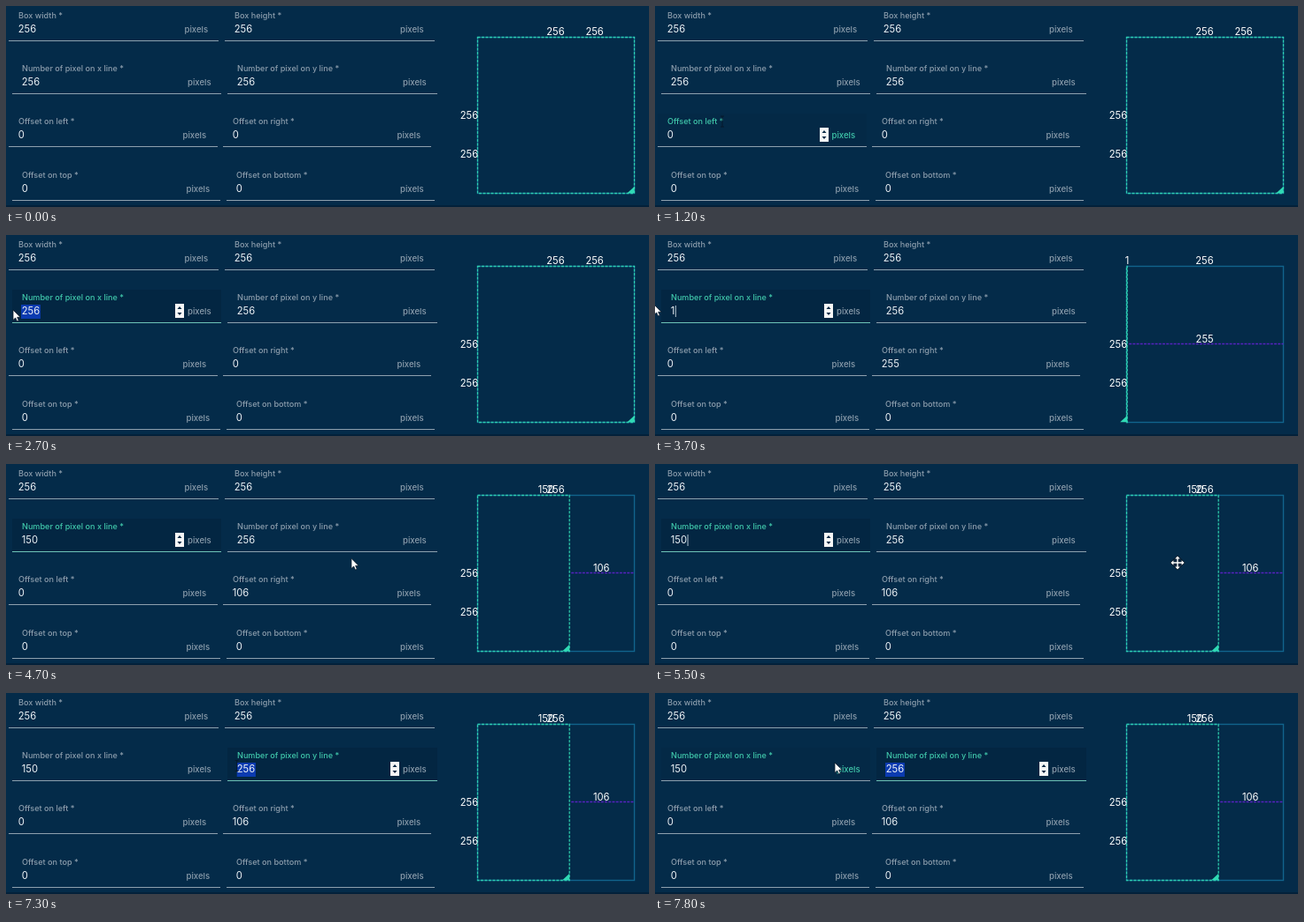
Recreate the animation shown at these times as an HTML page. Size 726 px wide and 228 px high, loop 8000 ms.

```html
<!DOCTYPE html>
<html lang="en">
<head>
<meta charset="utf-8">
<title>Box settings</title>
<style>
html, body { margin: 0; width: 100%; height: 100%; overflow: hidden; background: #042b49; }
svg { display: block; width: 726px; height: 228px; }
text { font-family: Inter, "Open Sans", sans-serif; }
.label { font-size: 9.1px; font-weight: 500; }
.unit { font-size: 9.6px; font-weight: 500; }
.value { font-size: 11.2px; fill: #eef2f6; }
.size { font-size: 11.2px; fill: #fff; text-anchor: middle; }
</style>
</head>
<body>
<svg id="stage" viewBox="0 0 726 228" xmlns="http://www.w3.org/2000/svg"></svg>
<script>
const LOOP = 8000, STEP = 100, BLINK = 530;
const GREEN = '#30d9b4', TEXT_GREEN = '#40c8ab', GREY = '#8c9dac', LINE = '#8fa1af';
const BOX = { x: 532.5, y: 35.5, size: 177 };
const stage = document.getElementById('stage');

function add(tag, attrs, parent = stage) {
  const el = document.createElementNS('http://www.w3.org/2000/svg', tag);
  set(el, attrs);
  parent.appendChild(el);
  return el;
}
function set(el, attrs) {
  for (const k in attrs) {
    if (k === 'text') el.textContent = attrs[k];
    else el.setAttribute(k, attrs[k]);
  }
}
const show = (el, on) => set(el, { visibility: on ? 'visible' : 'hidden' });

add('rect', { width: 726, height: 228, fill: '#042b49' });
add('rect', { y: 226, width: 726, height: 2, fill: '#03213a' });

// left edge, line width, line y, unit x, label, start value
const fields = [
  [3, 237, 39, 201.5, 'Box width *', '256'],
  [247, 237, 39, 445, 'Box height *', '256'],
  [7, 236, 99, 205, 'Number of pixel on x line *', '256'],
  [250, 237, 99, 448, 'Number of pixel on y line *', '256'],
  [3, 236, 159, 199.5, 'Offset on left *', '0'],
  [245, 235, 159, 441.5, 'Offset on right *', '0'],
  [7, 235, 220, 203.5, 'Offset on top *', '0'],
  [249, 235, 220, 445, 'Offset on bottom *', '0']
].map(([x, w, y, unitX, label, value]) => {
  const left = x + 11, base = y - 9.2, g = add('g', {});
  return {
    x, w, y, unitX, left,
    back: add('rect', { x, y: y - 37, width: w, height: 37, fill: '#001428' }, g),
    line: add('rect', { x, y, width: w, height: 1 }, g),
    label: add('text', { class: 'label', x: left, y: y - 24.7, text: label }, g),
    sel: add('rect', { y: y - 20, height: 16, fill: '#0b3bb0' }, g),
    value: add('text', { class: 'value', x: left - 0.3, y: base, text: value }, g),
    caret: add('rect', { y: y - 19, width: 1, height: 13, fill: '#b4c2ce' }, g),
    unit: add('text', { class: 'unit', x: unitX, y: base + 0.3, text: 'pixels' }, g),
    spin: add('path', {
      d: 'M0 0h10v16h-10zM2.5 6h5L5 3zM2.5 10h5L5 13z', fill: '#f6f6f6',
      'fill-rule': 'evenodd', transform: `translate(${Math.round(unitX - 13.8)} ${y - 21})`
    }, g)
  };
});
const X_LINE = fields[2], Y_LINE = fields[3], RIGHT = fields[5];

add('rect', { x: BOX.x, y: BOX.y, width: BOX.size, height: BOX.size, fill: 'none', stroke: '#11638c', 'stroke-width': 1.4 });
const gap = add('path', { stroke: '#5423bd', 'stroke-width': 1.3, 'stroke-dasharray': '3 1.2', fill: 'none' });
const inner = add('rect', { x: BOX.x, y: BOX.y, height: BOX.size, fill: 'none', stroke: GREEN, 'stroke-width': 1.3, 'stroke-opacity': 0.9, 'stroke-dasharray': '3 1.5' });
const grip = add('path', { d: 'M0 0h-8l8-7.5z', fill: GREEN });
const size = (x, y, text) => add('text', { class: 'size', x, y, text });
size(620.5, 33.3, '256');
size(523, 127.8, '256');
size(523, 172.2, '256');
const innerSize = size(0, 33.3, '');
const gapSize = size(0, 122.2, '');

const arms = [0, 90, 180, 270].map(a => `<path d="M-.7 0V-4.6H-2.8L0-7.6 2.8-4.6H.7V0z" transform="rotate(${a})"/>`).join('');
const pointers = {
  arrow: add('path', { d: 'M0 0V11.5L2.7 9 4.5 13 6.4 12.2 4.7 8.3H8.2z', fill: '#fff', stroke: '#0a1a2a', 'stroke-width': 0.8 }),
  beam: add('path', { d: 'M-2 -6H2M0 -6V6M-2 6H2', stroke: '#06182a', fill: 'none' }),
  move: add('g', {})
};
pointers.move.innerHTML = `<g stroke="#0a1a2a" stroke-width="1.6">${arms}</g><g fill="#fff">${arms}</g>`;

// time, x, y of the pointer
const path = [
  [0, 160, 250], [300, 150, 240], [800, 105, 145], [1200, 76, 131], [1500, 74, 128],
  [2000, 60, 88], [2700, 8, 85], [3100, -1, 79], [4100, -1, 79],
  [4600, 330, 100], [5000, 625, 135], [5500, 590, 112], [5800, 580, 114],
  [6300, 492, 108], [6600, 439, 87], [7000, 305, 85], [7500, 234, 81], [7800, 203, 79]
];
function pointerAt(t) {
  const i = path.findIndex(p => p[0] > t);
  if (i < 1) return path[i < 0 ? path.length - 1 : 0].slice(1);
  const [a, b] = [path[i - 1], path[i]];
  const k = (t - a[0]) / (b[0] - a[0]), e = k * k * (3 - 2 * k), m = (k + e) / 2;
  return [a[1] + (b[1] - a[1]) * m, a[2] + (b[2] - a[2]) * m];
}

const keys = [[3000, ''], [3700, '1'], [3900, '15'], [4000, '150']];
const inField = (f, [x, y]) => x >= f.x && x <= f.x + f.w && y >= f.y - 37 && y <= f.y;

function drawField(f, t, pos, focus, drag, caretOn) {
  const focused = f === focus, over = inField(f, pos);
  const settled = over && inField(f, pointerAt(t - 300));
  const width = f.value.getComputedTextLength();
  const from = Math.max(f.left - 1, pos[0]), end = f.left + width + 0.5;
  const selecting = focused && drag && from < end;
  set(f.back, { opacity: focused ? 0.2 : over ? 0.08 : 0 });
  set(f.line, { fill: focused ? '#6fc4b8' : LINE });
  set(f.label, { fill: focused || settled ? TEXT_GREEN : GREY });
  set(f.unit, { fill: over && !focused ? TEXT_GREEN : GREY });
  set(f.sel, { x: from, width: selecting ? end - from : 0 });
  set(f.caret, { x: f.left + width + 0.3 });
  show(f.caret, focused && !drag && caretOn);
  show(f.spin, focused || (settled && !drag));
}

function drawBox(w) {
  const right = BOX.x + w / 256 * BOX.size, edge = BOX.x + BOX.size, off = 256 - w;
  set(inner, { width: Math.max(0.01, right - BOX.x) });
  set(grip, { transform: `translate(${right} 212.2)` });
  set(innerSize, { x: BOX.x + w * 0.516, text: w || '' });
  set(gap, { d: `M${right + 2} 123.5H${edge}` });
  set(gapSize, { x: (right + edge) / 2 - 0.7, text: off });
  show(gap, off > 0);
  show(gapSize, off > 0);
}

function draw(t) {
  const pos = pointerAt(t);
  const key = keys.filter(k => k[0] <= t).pop() || [0, '256'];
  const w = Number(key[1]);
  const drag = (t >= 2000 && t < 3000) || t >= 7000;
  const focus = t >= 7000 ? Y_LINE : t >= 2000 ? X_LINE : null;
  const caretOn = Math.floor((t - key[0]) / BLINK) % 2 === 0;
  X_LINE.value.textContent = key[1];
  RIGHT.value.textContent = 256 - w;
  for (const f of fields) drawField(f, t, pos, focus, drag, caretOn);
  drawBox(w);

  const right = BOX.x + w / 256 * BOX.size;
  const [x, y] = pos;
  let shape = 'arrow';
  if (fields.some(f => inField(f, pos) && x >= f.left - 1 && x < f.unitX - 16)) shape = 'beam';
  else if (x > BOX.x && x < right && y > BOX.y && y < BOX.y + BOX.size) shape = 'move';
  for (const name in pointers) {
    show(pointers[name], name === shape);
    set(pointers[name], { transform: `translate(${x} ${y})` });
  }
}

const start = performance.now();
function tick() {
  const t = (performance.now() - start) % LOOP;
  draw(Math.floor(t / STEP) * STEP);
  requestAnimationFrame(tick);
}
tick();
</script>
</body>
</html>
```
